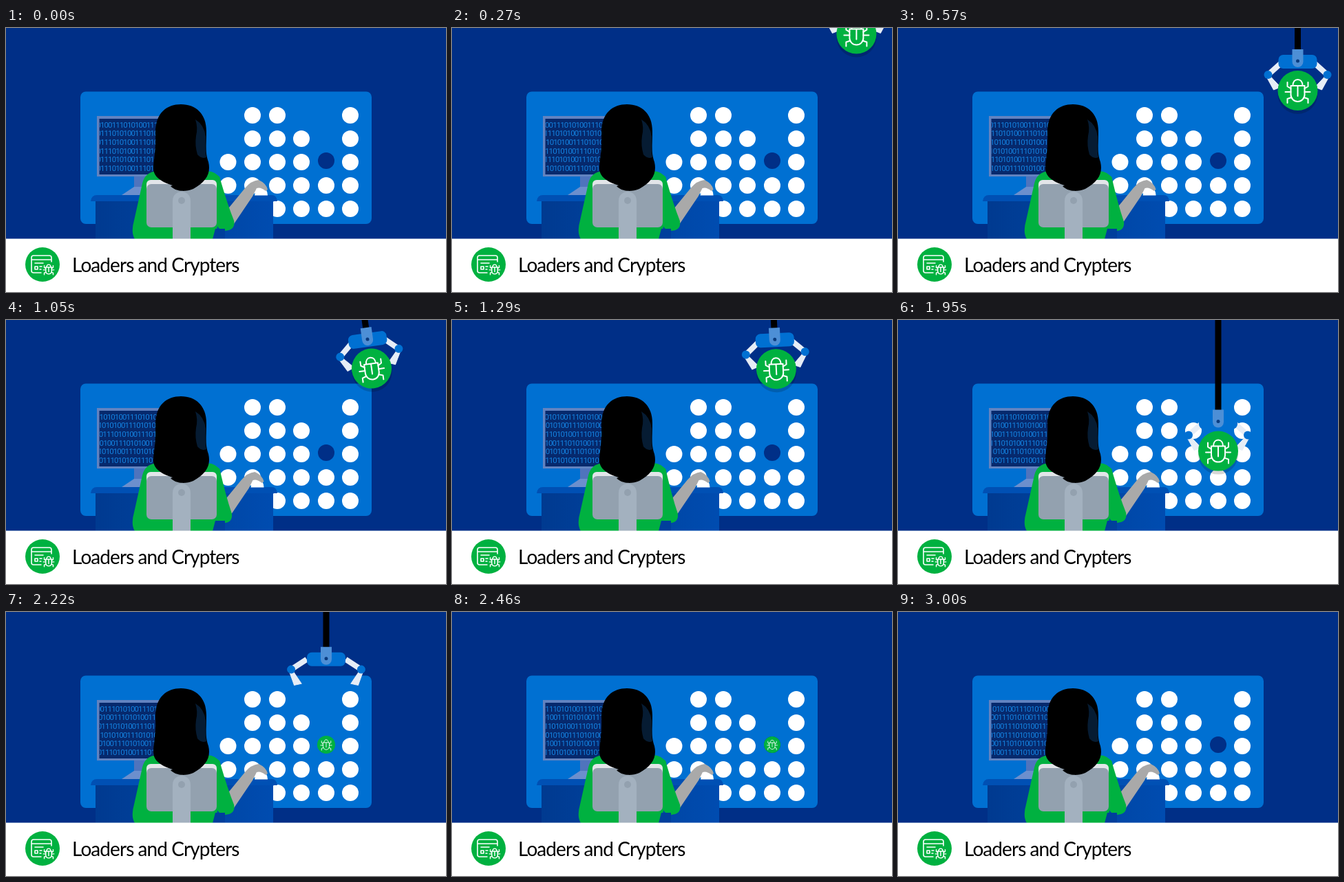
Recreate the animation shown at these times as an HTML page. Size 639x384 px, loop 3.03 s.

```html
<!DOCTYPE html>
<html lang="en">
<head>
<meta charset="utf-8">
<title>Loaders and Crypters</title>
<style>
  html, body { margin: 0; width: 100%; height: 100%; overflow: hidden; background: #002f87; }
  svg { display: block; width: 639px; height: 384px; }
  .digits { font: 11.5px Roboto, sans-serif; letter-spacing: -.9px; fill: #1482e0; }
  .title { font: 28px Lato, sans-serif; letter-spacing: -.93px; }
  .line { fill: none; stroke: #fff; stroke-linecap: round; stroke-linejoin: round; }
</style>
</head>
<body>
<svg viewBox="0 0 639 384">
  <defs>
    <clipPath id="screen"><rect x="136" y="132" width="90" height="81"/></clipPath>
    <linearGradient id="wood"><stop stop-color="#003a90"/><stop offset="1" stop-color="#004cb0"/></linearGradient>
    <g id="bug" class="line">
      <path d="M-10-7H10V6A10 10 0 0 1-10 6ZM-7-7C-7-13-4-16 0-16S7-13 7-7M0-7V8"/>
      <path d="M-10 2H-18M10 2H18M-10-3L-15-6V-12M10-3L15-6V-12M-9 10L-15 12V18M9 10L15 12V18"/>
    </g>
    <g id="limb">
      <path d="M23 2L43 20" stroke="#e6edf6" stroke-width="8"/>
      <path d="M39 23L47 20L35 42L25 38Z" fill="#e6edf6" stroke="#e6edf6"/>
      <circle cx="43" cy="20" r="6" fill="#0070d2"/>
    </g>
  </defs>

  <rect width="639" height="384" fill="#002f87"/>
  <rect x="108" y="92.5" width="423" height="192.5" rx="8" fill="#0070d2"/>
  <g id="dots" fill="#fff"></g>
  <circle cx="465" cy="193" r="12" fill="#002f87"/>

  <!-- desk and monitor -->
  <path d="M130 251H388V307H130Z" fill="url(#wood)"/>
  <path d="M123 252Q124 243 132 243H386Q393 243 394 252Z" fill="#0050b4"/>
  <path d="M186 216H215V243H168L186 231Z" fill="#6c8fcd"/>
  <path d="M186 216H215V231H186Z" fill="#4f74bd"/>
  <rect x="132" y="128" width="95" height="88" fill="#6283c0"/>
  <rect x="135.5" y="132" width="91" height="81" fill="#06296d"/>
  <g id="code" class="digits" clip-path="url(#screen)"></g>

  <!-- operator -->
  <g id="forearm">
    <path d="M361 243.500Q363 231 371 231Q380 234 380 243.500Z" fill="#fff"/>
    <path d="M320 266L347 233Q356 222 367 221Q378 226 380 235L377 237Q370 231 364 233L358 245L331 285Z" fill="#a9a9a9"/>
  </g>
  <path id="sleeve" d="M292 212L310 216Q321 255 331 280Q334 294 318 295Q306 294 302 276Z" fill="#00b140"/>
  <path d="M187 307Q181 297 186 280L198 226Q202 209 220 208H292Q306 209 311 219L310 270L304 307Z" fill="#00b140"/>
  <path d="M304 292H318V307H300Z" fill="#003f9c"/>
  <rect x="204" y="221" width="102" height="30" rx="6" fill="#e2e5e9"/>
  <rect x="204" y="227" width="102" height="63" rx="7" fill="#93a1af"/>
  <path d="M242 307V251A13 13 0 0 1 268 251V307Z" fill="#a3b1bf"/>
  <circle cx="255" cy="251" r="5" fill="#93a1af"/>
  <path d="M217 152C217 123 234 111 254 111C276 111 291 125 291 150C291 174 289 180 294 195C298 212 290 224 272 234C262 238 248 239 239 230L242 229C222 223 214 214 214 204C214 192 218 180 217 152Z"/>
  <path d="M275 133Q288 141 290 158Q289 178 291 188Q284 191 278 184Q274 171 276 157Q279 145 275 133Z" fill="#061c33"/>

  <!-- crane -->
  <g id="crane">
    <rect x="-4.500" y="-260" width="9" height="245"/>
    <g id="limbs"><use id="right" href="#limb"/><use id="left" href="#limb"/></g>
    <rect x="-28" y="-9" width="56" height="20" rx="7" fill="#0070d2"/>
    <path d="M-8-17H8V1A8 8 0 0 1-8 1Z" fill="#4d8fd6"/>
    <circle r="2.500" fill="#0a3c80"/>
  </g>
  <g id="ball">
    <circle id="shade" cy="5" r="29" opacity=".16"/>
    <circle r="29" fill="#00b140"/>
    <use href="#bug" stroke-width="2"/>
  </g>

  <!-- caption -->
  <rect y="306.500" width="639" height="78" fill="#fff"/>
  <circle cx="53" cy="344" r="25" fill="#00b140"/>
  <g class="line" stroke-width="1.600">
    <path d="M51 356H40Q37 356 37 353V334Q37 331 40 331H63Q66 331 66 334V340M37 337H66M42 342H54M42 347H46V351H42ZM49 347H52M49 351H51"/>
    <use href="#bug" transform="translate(62 351) scale(.43)" stroke-width="3.400"/>
  </g>
  <text class="title" x="96" y="355">Loaders and Crypters</text>
</svg>
<script>
  const LOOP = 3030, STEP = 30;
  const get = id => document.getElementById(id);
  const place = (id, value) => get(id).setAttribute('transform', value);
  const phase = (t, from, to) => Math.min(1, Math.max(0, (t - from) / (to - from)));
  const ease = (t, from, to) => (1 - Math.cos(Math.PI * phase(t, from, to))) / 2;

  // one row of dots per string
  const columns = [322.5, 358, 394, 429, 465, 500];
  get('dots').innerHTML = ['.xx..x', '.xxx.x', 'xxxx.x', 'xxxxxx', '..xxxx'].map((row, r) =>
    columns.map((x, c) => row[c] === 'x' ? `<circle cx="${x}" cy="${127 + r * 34}" r="12"/>` : '').join('')
  ).join('');

  const PERIOD = '001110101';
  const speeds = [5, 2.5, 8];
  get('code').innerHTML = speeds.concat(speeds).map((_, i) =>
    `<text y="${144.5 + i * 12.7}">${PERIOD.repeat(4)}</text>`).join('');
  const rows = [...get('code').children];

  function draw(t) {
    rows.forEach((row, i) => {
      const chars = (i ? 2 : 8) + speeds[i % 3] * t / 1000;
      const part = chars % 9 / 9;
      row.setAttribute('x', 137 - part * row.getSubStringLength(0, 9));
    });

    const reach = ease(t, 200, 600) - ease(t, 1560, 1900);
    place('forearm', `translate(${-5.5 * reach} 0)`);
    place('sleeve', `rotate(${3 * reach} 305 220)`);

    const x = 592 - 11.5 * ease(t, 60, 540) - 115.5 * ease(t, 755, 1360);
    const drop = -90 + 138 * ease(t, 60, 540) - 20 * ease(t, 570, 780) + 122 * ease(t, 1267, 2017);
    const y = drop - 250 * ease(t, 2080, 2440);
    const tilt = -8 * Math.sin(Math.PI * phase(t, 755, 1360));
    place('crane', `translate(${x} ${y}) rotate(${tilt})`);

    const open = -9 * ease(t, 2000, 2120);
    place('right', `rotate(${open} 23 2) translate(${-open * .6} 0)`);
    place('left', `scale(-1 1) rotate(${open} 23 2) translate(${-open * .6} 0)`);

    const shrink = ease(t, 2010, 2260);
    place('ball', `translate(${x} ${drop}) rotate(${tilt}) translate(0 43) scale(${1 - .586 * shrink})`);
    get('ball').setAttribute('opacity', 1 - phase(t, 2720, 2960));
    get('shade').setAttribute('opacity', .16 * (1 - shrink));
  }

  function tick() {
    draw(Math.floor(performance.now() / STEP) * STEP % LOOP);
    requestAnimationFrame(tick);
  }
  tick();
</script>
</body>
</html>
```
